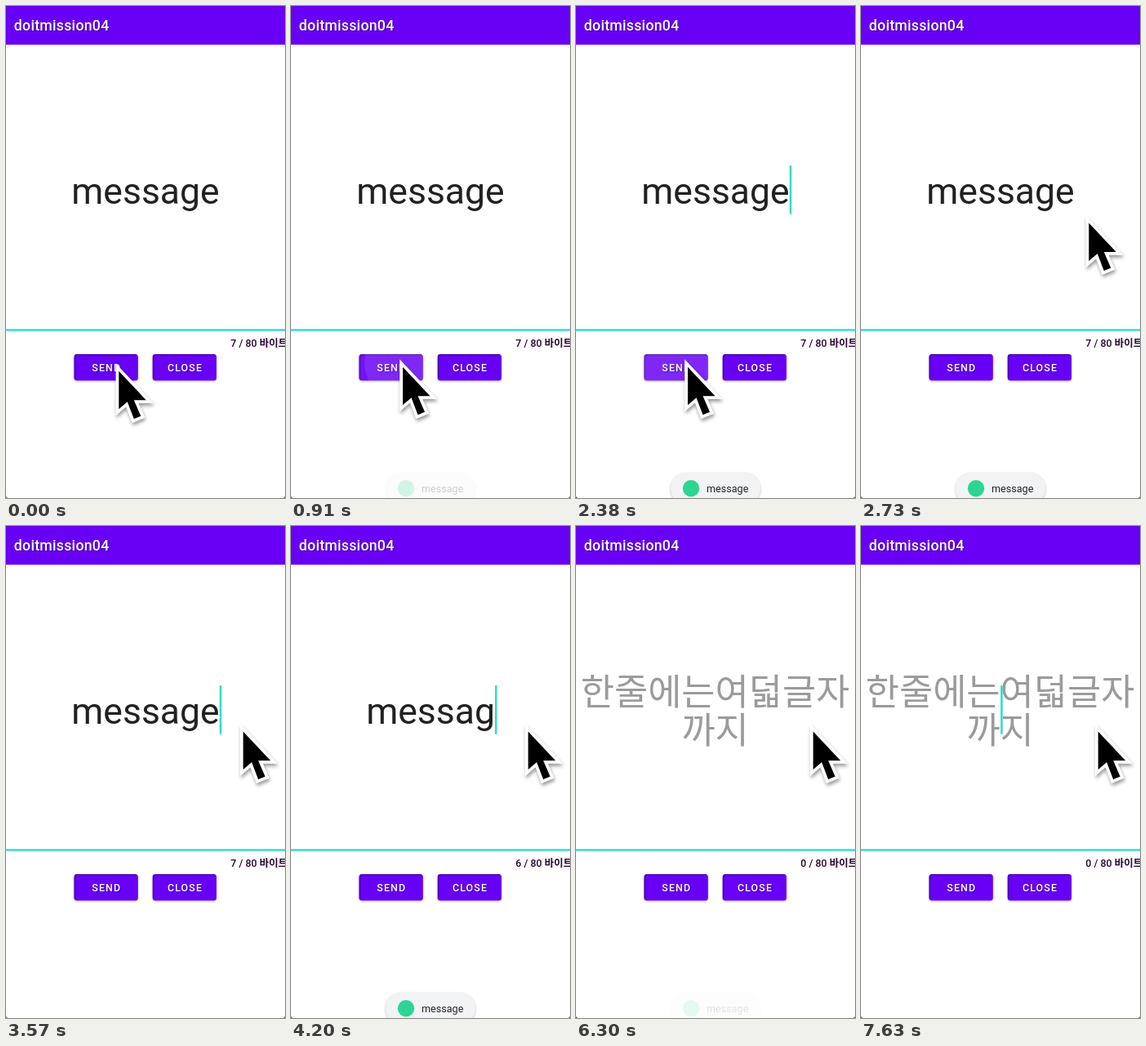
Recreate the animation shown at these times as an HTML page. Size 342x602 px, loop 8000 ms.

```html
<!DOCTYPE html>
<html lang="ko">
<head>
<meta charset="utf-8">
<title>doitmission04</title>
<style>
  html, body { margin: 0; width: 100%; height: 100%; overflow: hidden; background: #fff; }
  svg { display: block; width: 100%; height: 100%; }
  text { font-family: Roboto, "Noto Sans CJK KR", "Noto Sans CJK", sans-serif; }
  .title { font-size: 17.8px; font-weight: 500; letter-spacing: .0125em; fill: #fff; }
  .input { font-size: 44.5px; text-anchor: middle; fill: #212121; }
  .hint { font-size: 44.8px; fill: #9b9b9b; }
  .count { font-size: 12.46px; font-weight: 500; fill: #2b0433; }
  .unit { font-weight: 700; }
  .label { font-size: 12.46px; font-weight: 500; letter-spacing: .0893em; text-anchor: middle; fill: #fff; }
  .toast { font-size: 12.6px; fill: #252525; }
  .title, .label { text-shadow: 1px 1px 1px rgba(30, 0, 90, .5); }
  .accent { fill: #2fdcc9; filter: drop-shadow(.6px .3px .5px rgba(47, 220, 201, .6)); }
  .button { filter: drop-shadow(0 1.5px 1.2px rgba(0, 0, 0, .3)); }
  #toast { filter: drop-shadow(0 1px 1.5px rgba(0, 0, 0, .25)); }
  #pointer { filter: drop-shadow(1.5px 3px 2px rgba(0, 0, 0, .4)); }
</style>
</head>
<body>
<svg viewBox="0 0 342 602">
  <defs>
    <rect id="face" width="78.3" height="32.2" rx="3.5"/>
    <g id="button">
      <use href="#face" fill="#6800f5"/>
      <path d="M1 30V3.2Q1 .8 3.4 .8H76.5" fill="none" stroke="#380090" stroke-width="1.5" stroke-opacity=".65"/>
    </g>
    <clipPath id="faceShape"><use href="#face"/></clipPath>
  </defs>
  <rect width="342" height="602" fill="#fff"/>
  <rect width="342" height="47.4" fill="#6800f5"/>
  <text class="title" x="9.8" y="29.5">doitmission04</text>

  <text class="input" id="message" x="171" y="242"></text>
  <g id="hint">
    <text class="input hint" x="170.6" y="218.5">한줄에는여덟글자</text>
    <text class="input hint" x="170.6" y="265.8">까지</text>
  </g>
  <rect class="accent" id="caret" y="195.3" width="2.3" height="59.3"/>
  <rect class="accent" y="395.4" width="342" height="2.1"/>
  <text class="count" x="275.3" y="417"><tspan id="count"></tspan> / 80 <tspan class="unit">바이트</tspan></text>

  <g transform="translate(83.5 426)">
    <use class="button" href="#button"/>
    <g id="ripple" clip-path="url(#faceShape)" fill="#fff">
      <use href="#face" opacity=".35"/>
      <circle id="wave" cx="50" cy="11" opacity=".65"/>
    </g>
    <text class="label" x="39.8" y="21">SEND</text>
  </g>
  <g transform="translate(179.7 426)">
    <use class="button" href="#button"/>
    <text class="label" x="39.8" y="21">CLOSE</text>
  </g>

  <g id="toast">
    <rect x="116" y="571" width="110" height="39" rx="19.5" fill="#f2f3f4"/>
    <circle cx="141" cy="590.3" r="10.2" fill="#2ed592"/>
    <text class="toast" x="160" y="594.5">message</text>
  </g>

  <path id="pointer" d="M0 0V46.5L10.5 37.5L18.5 58.5L27 55L18.5 35.5H33.5Z"
        fill="#000" stroke="#fff" stroke-width="7.5" paint-order="stroke"/>
  <path d="M0 0H3Q0 0 0 3ZM342 0H339Q342 0 342 3ZM0 602H3Q0 602 0 599ZM342 602H339Q342 602 342 599Z" fill="#444"/>
</svg>
<script>
  const LOOP = 8000, TICK = 70, WORD = 'message';
  const BLINK = 520, DELETE_START = 4200, DELETE_EVERY = 221;
  const el = id => document.getElementById(id);
  const message = el('message'), hint = el('hint'), caret = el('caret'), count = el('count');
  const ripple = el('ripple'), wave = el('wave'), toast = el('toast'), pointer = el('pointer');

  const clamp = (v, max = 1) => Math.min(max, Math.max(0, v));
  const progress = (t, start, duration) => clamp((t - start) / duration);
  const smooth = p => p * p * (3 - 2 * p);
  const mix = (a, b, p) => a + (b - a) * p;
  const pulse = (t, start, fadeIn, hold, fadeOut) =>
    progress(t, start, fadeIn) - progress(t, start + hold, fadeOut);

  function drawInput(t) {
    const deleted = clamp(Math.floor((t - DELETE_START) / DELETE_EVERY) + 1, WORD.length);
    const length = WORD.length - deleted;
    message.textContent = WORD.slice(0, length);
    count.textContent = length;
    hint.style.opacity = length ? 0 : 1;

    // Each deletion restarts the blink with a visible caret.
    const shownAt = deleted ? DELETE_START + (deleted - 1) * DELETE_EVERY : TICK;
    const visible = Math.floor((t - shownAt) / BLINK) % 2 === 0;
    const width = length ? message.getComputedTextLength() : 0;
    caret.setAttribute('x', 171.2 + width / 2);
    caret.style.opacity = visible ? 1 : 0;
  }

  function drawButton(t) {
    const press = t < 1960 ? 700 : 1960;
    ripple.style.opacity = .2 * pulse(t, press, 140, 420, 350);
    wave.setAttribute('r', 58 * progress(t, press, 280));
  }

  function drawToast(t) {
    const show = start => pulse(t, start, 320, 2380, 320);
    toast.style.opacity = show(840) + show(3640);
  }

  function drawPointer(t) {
    const settle = smooth(progress(t, 350, 280));
    const leave = smooth(progress(t, 2380, 420));
    const x = mix(mix(138.3, 137, settle), 290.7, leave);
    const y = mix(mix(446.7, 441.7, settle), 251.5, leave);
    pointer.setAttribute('transform', `translate(${x} ${y})`);
  }

  const start = performance.now();
  function frame() {
    const elapsed = (performance.now() - start) % LOOP;
    const t = Math.floor(elapsed / TICK) * TICK;
    [drawInput, drawButton, drawToast, drawPointer].forEach(draw => draw(t));
    requestAnimationFrame(frame);
  }
  frame();
</script>
</body>
</html>
```
